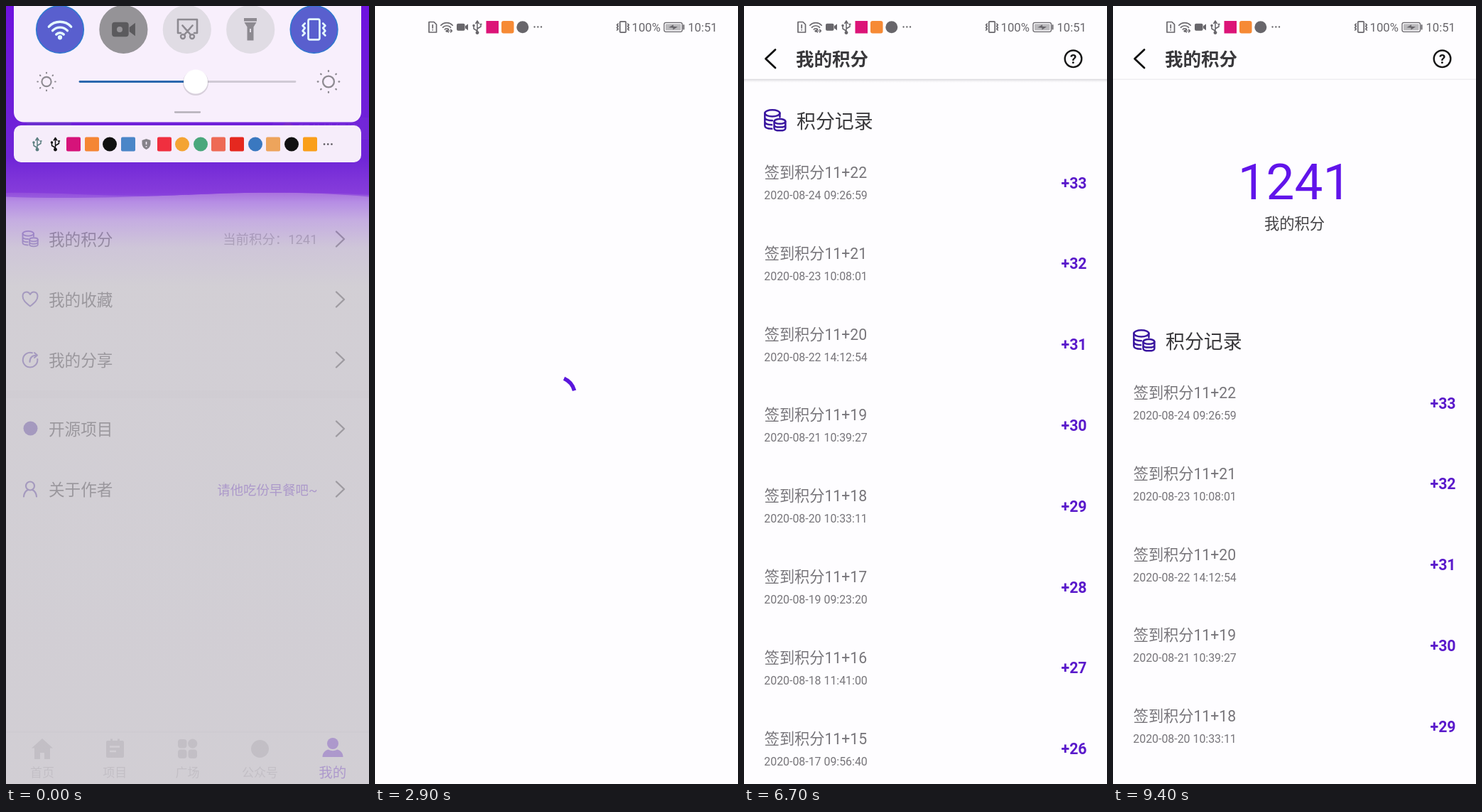
An HTML page that plays this animation: 511x1095 px, repeating every 9700 ms.

```html
<!DOCTYPE html>
<html lang="zh-CN">
<head>
<meta charset="utf-8">
<title>我的积分</title>
<style>
html, body { margin: 0; width: 100%; height: 100%; overflow: hidden; background: #fefdff; }
svg { display: block; width: 100vw; height: 100vh; }
text { font-family: Roboto, "Noto Sans CJK SC", "Noto Sans CJK", sans-serif; white-space: pre; }
.line { fill: none; stroke: currentColor; stroke-linecap: round; stroke-linejoin: round; }
.mid { text-anchor: middle; }
.end { text-anchor: end; }
</style>
</head>
<body>
<svg viewBox="0 0 511 1095" preserveAspectRatio="none">
<defs>
  <linearGradient id="scrimFill" x1="0" y1="0" x2="0" y2="1">
    <stop offset="0" stop-color="#6e12de" stop-opacity=".96"/>
    <stop offset=".195" stop-color="#7026d4" stop-opacity=".9"/>
    <stop offset=".24" stop-color="#9048d4" stop-opacity=".77"/>
    <stop offset=".252" stop-color="#a06cdc" stop-opacity=".77"/>
    <stop offset=".275" stop-color="#b495d8" stop-opacity=".77"/>
    <stop offset=".31" stop-color="#c0b5cd" stop-opacity=".77"/>
    <stop offset=".36" stop-color="#c5c1c8" stop-opacity=".77"/>
    <stop offset="1" stop-color="#c4c0c7" stop-opacity=".77"/>
  </linearGradient>
  <linearGradient id="shade" x1="0" y1="0" x2="0" y2="1">
    <stop offset="0" stop-color="#d9d8dc"/>
    <stop offset="1" stop-color="#fefdff" stop-opacity="0"/>
  </linearGradient>
  <clipPath id="listArea"><rect y="104" width="511" height="991"/></clipPath>
  <g id="wifi" class="line">
    <path d="M-14-3a19 19 0 0 1 28 0M-9.3 2a12.6 12.6 0 0 1 18.6 0M-4.7 6.7a6.4 6.4 0 0 1 9.4 0"/>
    <circle cy="10.5" r="1.3" fill="currentColor"/>
  </g>
  <g id="vibrate" class="line">
    <rect x="-7.5" y="-13.5" width="15" height="27" rx="2"/>
    <path d="M-12-8l-3 3 3 3-3 4 3 3-3 3M12-8l3 3-3 3 3 4-3 3 3 3"/>
  </g>
  <g id="usb" class="line" stroke-width="1.5">
    <path d="M0 7V-8M-2.2-5.5L0-9l2.2 3.5M0 5l-5-3v-4M0 2l5-3v-3"/>
    <circle cy="7.5" r="1.7" fill="currentColor"/>
    <circle cx="-5" cy="-2.5" r="1" fill="currentColor"/>
    <path d="M4-4.5h2"/>
  </g>
  <g id="camera" fill="currentColor">
    <rect x="-8" y="-5" width="11.5" height="10" rx="2"/><path d="M4-1.5l4-3v9l-4-3z"/>
  </g>
  <g id="coins" class="line" stroke-width="1.9">
    <ellipse cx="9" cy="4.4" rx="8" ry="3.5"/>
    <path d="M1 4.4v13.4c0 2 3 3.2 7.5 3.3M17 4.4v4.3M1 9c0 2 3.4 3.4 8 3.4M1 13.4c0 2 3 3.3 7.4 3.4"/>
    <ellipse cx="17" cy="13.2" rx="6" ry="2.6"/>
    <path d="M11 13.2v7.2c0 1.6 2.7 2.6 6 2.6s6-1 6-2.6v-7.2M11 16.8c0 1.6 2.7 2.6 6 2.6s6-1 6-2.6"/>
  </g>
  <g id="sun" class="line">
    <circle r="6.3"/>
    <path d="M0-11.5v-.6M0 11.5v.6M11.5 0h.6M-11.5 0h-.6M8.2-8.2l.4-.4M-8.2-8.2l-.4-.4M8.2 8.2l.4.4M-8.2 8.2l-.4.4"/>
  </g>
</defs>

<rect width="511" height="1095" fill="#fefdff"/>

<g id="me">
  <rect width="511" height="1095" fill="#fefdff"/>
  <path d="M0 0H511V268.500C460 263.500 400 262 335 263C270 264 190 269.500 100 270Q40 270.300 0 268.500Z" fill="#9a61f4"/>
  <path d="M0 0H511V266C460 263 400 262 335 263C290 264 230 267.500 190 267.500C120 267 60 262 0 263Z" fill="#6415f0"/>
  <g color="#fff">
    <path class="line" stroke-width="2.7" d="M468.500 58l11.800 6.600v13L468.500 84.300l-11.800-6.700v-13z"/>
    <circle class="line" cx="468.500" cy="71" r="4" stroke-width="2.7"/>
  </g>
  <circle cx="60.500" cy="160.500" r="32" fill="#3dbd82"/>
  <g fill="#fff">
    <text x="106.500" y="153" font-size="22.700">12000340567</text>
    <text x="106.500" y="185" font-size="16.800">ID.30132</text>
    <rect x="188.500" y="169.500" width="51" height="18" rx="9" fill="none" stroke="#fff" stroke-width="1.500"/>
    <text class="mid" x="214" y="183.500" font-size="14.200">lv.13</text>
    <path d="M511 157H389.500a15.500 15.500 0 0 0 0 31H511z" fill-opacity=".27"/>
    <circle cx="396.800" cy="172.500" r="8.500" fill="#fba31c"/>
    <circle cx="396.800" cy="172.500" r="5.800" fill="none" stroke="#fdc04e"/>
    <circle cx="396.800" cy="172.500" r="2" fill="#ffe0a0"/>
    <text x="411.300" y="179.500" font-size="17">积分排行榜</text>
  </g>
  <rect y="541" width="511" height="11" fill="#f6f5f8"/>
  <g id="menu"></g>
  <text class="end" x="438.500" y="334.500" font-size="18.400" fill="#6a696c">当前积分：1241</text>
  <text class="end" x="438.500" y="687.500" font-size="18.400" fill="#5a14d2">请他吃份早餐吧~</text>
  <g color="#3a17a0">
    <use href="#coins" transform="translate(22.500 316) scale(.97)"/>
    <path class="line" stroke-width="2" d="M34 422.500C27 417 23.500 413.500 23.500 408.500C23.500 402 31 400.500 34 406C37 400.500 44.500 402 44.500 408.500C44.500 413.500 41 417 34 422.500Z"/>
    <path class="line" stroke-width="2" d="M37 488.300A10.300 10.300 0 1 0 44.300 497M33.500 501C33.500 494 37 491.500 43.500 491.500M40 488l4 3.500-4 3.500"/>
    <circle cx="34.500" cy="594.500" r="10" fill="currentColor"/>
    <circle class="line" cx="34" cy="675.500" r="6" stroke-width="2.200"/>
    <path class="line" stroke-width="2.200" d="M25 690.500c.5-5 2.500-8 6-9.500M43 690.500c-.5-5-2.500-8-6-9.500"/>
  </g>
  <rect y="1020.500" width="511" height="2.500" fill="#f3f2f5"/>
  <g id="nav" fill="#bdbbbf">
    <path d="M51 1031l15 13.500h-4v15.500h-8v-9h-6v9h-8v-15.500h-4z"/>
    <path d="M143 1034h4v-2.500h3v2.500h7v-2.500h3v2.500h4q2 0 2 2v20q0 2-2 2h-21q-2 0-2-2v-20q0-2 2-2z"/>
    <path d="M146 1042.500h14M146 1049h9" stroke="#fefdff" stroke-width="2.400"/>
    <rect x="242" y="1032" width="12.500" height="12.500" rx="4"/>
    <circle cx="262.700" cy="1038.200" r="6.600"/>
    <rect x="242" y="1046.500" width="12.500" height="12.500" rx="4"/>
    <rect x="256.500" y="1046.500" width="12.500" height="12.500" rx="4"/>
    <circle cx="357.500" cy="1045.500" r="12.500"/>
    <g fill="#5f14dc">
      <circle cx="460" cy="1038" r="8"/>
      <path d="M445.500 1057c0-6 4-9.500 8-10.500q6.500 3.500 13 0c4 1 8 4.500 8 10.500z"/>
    </g>
  </g>
</g>

<rect id="scrim" width="511" height="1095" fill="url(#scrimFill)"/>

<g id="points">
  <rect width="511" height="1095" fill="#fefdff"/>
  <circle id="spin" cx="255.500" cy="548" r="26" fill="none" stroke="#5a16dc" stroke-width="5.500" pathLength="360"/>
  <g id="content">
    <g clip-path="url(#listArea)">
      <g id="list">
        <text id="total" class="mid" x="255.500" y="272" font-size="71" fill="#6114ea"></text>
        <text class="mid" x="255.500" y="314" font-size="21.300" fill="#444346">我的积分</text>
        <use href="#coins" color="#3a17a0" transform="translate(28 455) scale(1.320)"/>
        <text x="74" y="482" font-size="26.900" fill="#39383b">积分记录</text>
      </g>
    </g>
    <rect y="102.500" width="511" height="1.500" fill="#efeef1"/>
    <rect id="edge" y="103" width="511" height="6" fill="url(#shade)"/>
    <path class="line" d="M44 61.500L30.500 74.300 44 87" color="#111" stroke-width="2.800"/>
    <text x="73" y="84.300" font-size="25.500" font-weight="700" fill="#39383b">我的积分</text>
    <circle class="line" cx="463.500" cy="74.300" r="11.800" color="#161616" stroke-width="2.400"/>
    <text class="mid" x="463.500" y="81" font-size="18.500" font-weight="700" fill="#161616">?</text>
  </g>
</g>

<g id="status">
  <path class="line" stroke-width="1.700" d="M76 22.500h7l3.500 3.500v11h-10.500z"/>
  <path class="line" stroke-width="1.700" d="M81.200 26.500v4.500M81.200 33.700v.1"/>
  <use href="#wifi" transform="translate(101 29) scale(.59)" stroke-width="2.800"/>
  <path class="line" stroke-width="1.200" d="M101.500 35h7M103.500 33l-2 2 2 2M106.500 33l2 2-2 2"/>
  <use href="#camera" x="123" y="29.700"/>
  <use href="#usb" x="144" y="30"/>
  <rect x="156.500" y="21" width="17.500" height="17.500" fill="#dc1478"/>
  <rect x="178" y="21" width="17.500" height="17.500" rx="3" fill="#f68a35"/>
  <circle cx="207.800" cy="29.700" r="8.500" fill="currentColor"/>
  <path class="line" d="M224.500 29.500h.1M229.300 29.500h.1M234 29.500h.1" stroke-width="2.300"/>
  <use href="#vibrate" transform="translate(349 29.500) scale(.56)" stroke-width="3"/>
  <text x="361.500" y="36" font-size="16.700" fill="currentColor">100%</text>
  <rect class="line" x="407" y="23.300" width="25.500" height="13" rx="2.500" stroke-width="1.300"/>
  <rect x="409" y="25.300" width="21.500" height="9" rx="1" fill="currentColor" fill-opacity=".45"/>
  <path d="M413.500 30.300l6.500-4v2.500l6 .5-6.500 4.200v-2.700z" fill="currentColor"/>
  <rect x="433.500" y="26" width="2" height="7.500" rx="1" fill="currentColor"/>
  <text x="440.500" y="36" font-size="16.600" fill="currentColor">10:51</text>
</g>

<g id="panel">
  <path d="M11-100H500V149.500a14 14 0 0 1-14 14H25a14 14 0 0 1-14-14z" fill="#f8effc"/>
  <rect x="11" y="168" width="489" height="52" rx="10" fill="#f6edfa"/>
  <g id="toggles"></g>
  <use href="#wifi" transform="translate(76 32.500) scale(1.120)" color="#e4fbff" stroke-width="3"/>
  <use href="#camera" transform="translate(165.500 33) scale(2.050)" color="#5b5a5d"/>
  <circle cx="160" cy="33" r="4" fill="#959397"/>
  <path class="line" color="#8d8a91" stroke-width="2.600" d="M246 38h-4V19h27v19h-4M248.500 27.500l11.500 13M262.500 27.500l-11.500 13"/>
  <g class="line" color="#8d8a91" stroke-width="2.400"><circle cx="249" cy="43" r="3"/><circle cx="262" cy="43" r="3"/></g>
  <path d="M335 17h18v4.500h-18zM335.500 23h17l-4 6.500v19h-9v-19z" fill="#8d8a91"/>
  <path d="M344 32v5" stroke="#e0dce4" stroke-width="2"/>
  <use href="#vibrate" transform="translate(433.500 33) scale(1.060)" color="#e4fbff" stroke-width="2.500"/>
  <path class="line" color="#d0cad5" stroke-width="2.800" d="M104 106.500H407"/>
  <path class="line" color="#2b68ae" stroke-width="2.800" d="M104 106.500H267"/>
  <circle cx="267" cy="108" r="18" fill="#000" fill-opacity=".13"/>
  <circle cx="267" cy="106.500" r="17" fill="#fff"/>
  <use href="#sun" transform="translate(57 106.500) scale(1.050)" color="#8d8a91" stroke-width="2"/>
  <use href="#sun" transform="translate(454 106.500) scale(1.260)" color="#8d8a91" stroke-width="1.800"/>
  <path class="line" color="#b5b0b9" stroke-width="2.300" d="M238 149.500H273"/>
  <use href="#usb" x="44" y="194.500" color="#5c7f80"/>
  <use href="#usb" x="69.500" y="194.500" color="#111"/>
  <path d="M197.500 187l6 2v5q0 5-6 8-6-3-6-8v-5z" fill="#86838a"/>
  <path d="M197.500 191v4M197.500 197v1.500" stroke="#f6edfa" stroke-width="1.600"/>
  <path class="line" color="#57545a" stroke-width="2.600" d="M448 194.500h.1M453.200 194.500h.1M458.400 194.500h.1"/>
</g>

<circle id="touch" r="16" fill="#fff" fill-opacity=".75" stroke="#b9aed6" stroke-opacity=".75" stroke-width="2"/>
</svg>

<script>
const LOOP = 9700, STEP = 100, PITCH = 113.8;
const $ = id => document.getElementById(id);
const clamp = v => Math.max(0, Math.min(1, v));
const part = (t, a, b) => clamp((t - a) / (b - a));
const easeOut = p => 1 - (1 - p) ** 2;

function add(parent, tag, attrs, text = '') {
  const el = document.createElementNS('http://www.w3.org/2000/svg', tag);
  for (const k in attrs) el.setAttribute(k, attrs[k]);
  el.textContent = text;
  return parent.appendChild(el);
}

const days = `24 09:26:59,23 10:08:01,22 14:12:54,21 10:39:27,20 10:33:11,19 09:23:20,
18 11:41:00,17 09:56:40,16 14:34:32,14 15:53:01,11 22:30:13,05 16:00:58,
04 09:34:35,03 09:21:23,02 07:26:58,01 14:12:07`.split(/,\s*/);
days.forEach((day, i) => {
  const y = i * PITCH;
  add($('list'), 'text', { x: 28.7, y: 552 + y, 'font-size': 21.2, fill: '#77757a' }, `签到积分11+${22 - i}`);
  add($('list'), 'text', { x: 28.3, y: 582 + y, 'font-size': 15.9, fill: '#77757a' }, `2020-08-${day}`);
  add($('list'), 'text', { x: 482.6, y: 566.5 + y, 'font-size': 21.3, 'font-weight': 700, fill: '#5a1acb', class: 'end' }, `+${33 - i}`);
});

[['我的积分', 328], ['我的收藏', 413], ['我的分享', 498], ['开源项目', 595], ['关于作者', 680]].forEach(([label, y]) => {
  add($('menu'), 'text', { x: 60, y: y + 8.5, 'font-size': 22.6, fill: '#0c0c0d' }, label);
  add($('menu'), 'path', { d: `M465 ${y - 10.5}l11 10.5-11 10.5`, class: 'line', color: '#1c1c1e', 'stroke-width': 2.4 });
});

['首页', '项目', '广场', '公众号', '我的'].forEach((label, i) => {
  const on = i === 4;
  add($('nav'), 'text', {
    x: 51 + i * 102.2, y: on ? 1085.5 : 1085, class: 'mid',
    'font-size': on ? 19.5 : 17, fill: on ? '#5f14dc' : '#bdbbbf'
  }, label);
});

['#595fce', '#959397', '#e0dce4', '#e0dce4', '#595fce'].forEach((fill, i) => add($('toggles'), 'circle', {
  cx: 76 + i * 89.4, cy: 33, r: 33.3, fill, stroke: i % 4 ? fill : '#2f78cf', 'stroke-width': 1.6
}));

// colour and shape of each notification badge
[[95, '#d6137a'], [121, '#f58634'], [146, '#111', 1], [172, '#4a86c8'], [223, '#f02f3f'], [248, '#f4a433', 1],
 [274, '#4aa77c', 1], [299, '#ee6a55'], [325, '#e5281f'], [351, '#3a78c0', 1], [376, '#eda45c'],
 [402, '#111', 1], [428, '#fa9f1a']].forEach(([x, fill, round]) => add($('panel'), 'rect', {
  x: x - 10, y: 184.5, width: 20, height: 20, rx: round ? 10 : 2, fill
}));

// [ms, list offset]
const scrollKeys = [[6400, 0], [6500, 45], [6600, 170], [6700, 310], [6800, 410], [6900, 485], [7000, 540],
  [7200, 605], [7400, 627], [7500, 665], [7600, 790], [7700, 925], [7800, 1030], [7900, 1110], [8000, 1165],
  [8200, 1215], [8300, 1215], [8400, 1090], [8500, 860], [8600, 560], [8700, 300], [8800, 110], [8900, 0]];

function scrollAt(t) {
  const i = scrollKeys.findIndex(k => k[0] > t);
  if (i < 1) return 0;
  const [a, from] = scrollKeys[i - 1], [b, to] = scrollKeys[i];
  return from + (to - from) * part(t, a, b);
}

// [press, release, finger y at press, offset at press]
const drags = [[6430, 6680, 760, 0], [7430, 7680, 760, 627], [8230, 8480, 395.5, 1215]];

function draw(t) {
  const close = part(t, 0, 450);
  $('panel').setAttribute('transform', `translate(0 ${-240 * close * close})`);
  $('panel').style.display = close < 1 ? '' : 'none';
  $('scrim').setAttribute('opacity', 1 - part(t, 80, 700));

  const slide = easeOut(part(t, 2150, 2550));
  $('me').setAttribute('transform', `translate(${-130 * slide} 0)`);
  $('points').setAttribute('transform', `translate(${511 * (1 - slide)} 0)`);
  $('status').setAttribute('color', slide < .5 ? '#fff' : '#68666b');
  $('status').setAttribute('opacity', part(t, 250, 500));

  const show = part(t, 3300, 3400), turn = t - 2900;
  const span = 145 - 105 * Math.cos(.46 + turn / 1333 * 2 * Math.PI);
  $('spin').setAttribute('stroke-dasharray', `${span} ${360 - span}`);
  $('spin').setAttribute('transform', `rotate(${-66 + turn * .3} 255.5 548)`);
  $('spin').setAttribute('opacity', 1 - show);
  $('content').setAttribute('opacity', show);
  $('total').textContent = Math.round(1241 * easeOut(part(t, 3380, 5380)));

  const top = scrollAt(t);
  $('list').setAttribute('transform', `translate(0 ${-top})`);
  $('edge').setAttribute('opacity', clamp(top / 60));

  const drag = drags.find(d => t >= d[0] && t < d[1]);
  $('touch').style.display = drag ? '' : 'none';
  if (drag) $('touch').setAttribute('transform', `translate(353 ${drag[2] + drag[3] - top})`);
}

function tick() {
  const t = (performance.now() + 5) % LOOP;
  draw(Math.floor(t / STEP) * STEP);
  requestAnimationFrame(tick);
}
tick();
</script>
</body>
</html>
```
